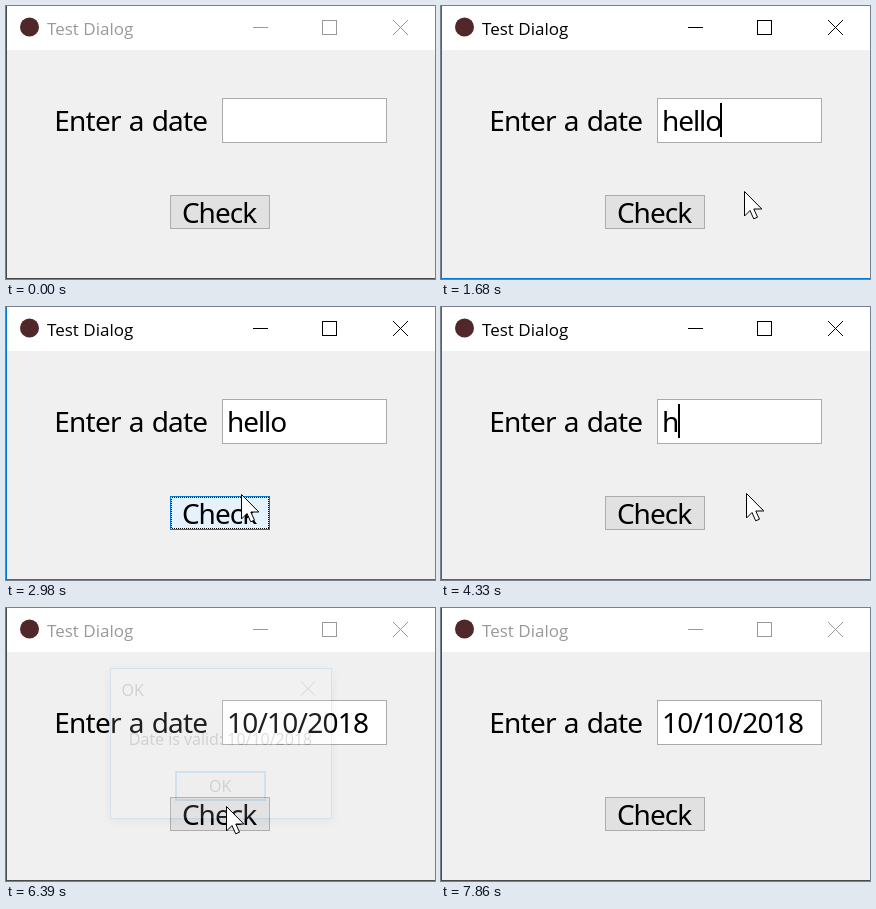
Write an HTML page that moves like this. It is 429 by 273 pixels and loops after 7930 ms.

```html
<!DOCTYPE html>
<html lang="en">
<head>
<meta charset="utf-8">
<title>Test Dialog</title>
<style>
  html, body { margin: 0; width: 100%; height: 100%; overflow: hidden; background: #f0f0f0; }
  svg { display: block; width: 429px; height: 273px; }
  text { white-space: pre; }
  .ui { font: 17.2px "Open Sans", "Noto Sans", sans-serif; }
  .form { font: 28px "Noto Sans", "Open Sans", sans-serif; letter-spacing: -.78px; }
  .mid { text-anchor: middle; }
  .glyph { fill: none; stroke: #000; }
  .box, .caret { shape-rendering: crispEdges; }
  .button { fill: #e1e1e1; stroke: #adadad; }
  .button.focus { stroke: #0078d7; stroke-width: 2; }
  .button.hover { fill: #e5f1fb; stroke: #0078d7; stroke-width: 1; }
  .button.down { fill: #cce4f7; stroke: #005499; stroke-width: 1; }
  #main .title { font-size: 17px; }
  #main.idle .title { fill: #999; }
  #main.idle .glyph { stroke: #999; }
  #main .edge { fill: #0078d7; }
  #main.idle .edge { fill: #4a4a4a; }
  #dialog { transform-origin: 215px 135px; filter: drop-shadow(0 3px 6px rgba(0, 0, 0, .38)); }
</style>
</head>
<body>
<svg viewBox="0 0 429 273">
  <g id="main">
    <rect width="429" height="273" fill="#f0f0f0"/>
    <rect width="429" height="44" fill="#fff"/>
    <rect class="edge box" width="1" height="273"/>
    <rect class="edge box" y="272" width="429" height="1"/>
    <circle cx="23.5" cy="21" r="9.5" fill="#50282a"/>
    <text class="ui title" x="41" y="29">Test Dialog</text>
    <path class="glyph box" d="M247 21.5h15M316.500 14.500h14v14h-14z"/>
    <path class="glyph" d="M387 14l15 15m0-15l-15 15"/>
    <text class="form" x="48.300" y="125" word-spacing="1.5">Enter a date</text>
    <rect class="box" x="216.500" y="92.500" width="164" height="44" fill="#fff" stroke="#ababab"/>
    <text class="form" id="value" x="221" y="125"></text>
    <rect class="caret" id="caret" y="97" width="1.500" height="34"/>
    <rect class="button box" id="check" x="164.500" y="189.500" width="99" height="33"/>
    <rect class="box" id="dots" x="165.500" y="190.500" width="97" height="31"
          fill="none" stroke="#000" stroke-dasharray="1 1"/>
    <text class="form mid" x="213" y="217" style="letter-spacing:-1px">Check</text>
  </g>
  <g id="dialog">
    <rect class="box" id="frame" y="54.500" height="162" fill="#f0f0f0" stroke="#1b83d6"/>
    <rect class="box" id="bar" y="55" height="44" fill="#fff"/>
    <text class="ui" id="heading" y="84"></text>
    <path class="glyph" id="close" d="M0 0l15 15m0-15l-15 15"/>
    <text class="ui mid" id="message" x="214.500" y="137"></text>
    <rect class="button box focus" id="ok" x="167" y="166" width="95" height="30"/>
    <text class="ui mid" x="214" y="188">OK</text>
  </g>
  <path id="arrow" d="M0 0V24.500L5.500 19 9.200 27.300 13 25.700 9.300 17.500H17.300Z" fill="#fff" stroke="#000"/>
  <path id="beam" d="M-4.500-11.500h4l.5 1 .5-1h4M0-11V11M-4.500 11.500h4l.5-1 .5 1h4" fill="none" stroke="#000"/>
</svg>
<script>
const LOOP = 7930;
const el = id => document.getElementById(id);

// Evenly timed successive prefixes of a word.
const typing = (word, from, to, start, gap) =>
  Array.from({ length: to - from }, (_, i) => [start + i * gap, word.slice(0, from + i + 1)]);
const DATE = '10/10/2018';
const VALUE = [
  [0, ''],
  ...typing('hello', 0, 5, 1110, 35),
  [4190, 'hell'], [4230, 'hel'], [4280, 'he'], [4330, 'h'], [4390, ''],
  ...typing(DATE, 0, 7, 4860, 43),
  ...typing(DATE, 7, 10, 5450, 40)
];

// Times at which the flag flips, beginning from off.
const CARET = [360, 590, 820, 1050, 1110, 1480, 1680, 1910, 3700, 3930, 4130,
               4590, 4820, 5350, 5450, 5650, 5880, 6110];
const ACTIVE = [360, 2040, 2930, 6380, 7290, 7860];
const CHECK_FOCUS = [1990, 3700, 6330, 7860];
const PRESS = [1960, 2010, 2840, 2900, 6300, 6350, 7220, 7270];

const DIALOGS = [
  { open: 2040, shut: 2890, x: 112, width: 205, heading: 'Error', message: 'Date is invalid: hello' },
  { open: 6380, shut: 7250, x: 96, width: 237, heading: 'OK', message: 'Date is valid: ' + DATE }
];
const FADE = 85;

const MOUSE = [
  [130, 440, 165], [330, 284, 115], [400, 284, 115], [590, 303, 185],
  [1680, 303, 185], [1930, 222, 199], [2730, 222, 199], [2830, 235, 187],
  [3300, 235, 187], [3620, 288, 116], [3730, 288, 116], [3930, 305, 186],
  [6050, 305, 186], [6270, 220, 198], [6980, 220, 198], [7120, 223, 187],
  [7350, 223, 187], [7630, 330, 290]
];

const pick = (steps, t) => steps.reduce((v, s) => s[0] <= t ? s[1] : v, steps[0][1]);
const isOn = (flips, t) => flips.filter(f => f <= t).length % 2 === 1;
const clamp = v => Math.max(0, Math.min(1, v));
const inside = ([x, y], l, t, r, b) => x >= l && x < r && y >= t && y < b;
const show = (node, on) => node.style.display = on ? '' : 'none';

function mouseAt(t) {
  const i = MOUSE.findIndex(p => p[0] > t);
  if (i < 1) return [440, 290];
  const [t0, x0, y0] = MOUSE[i - 1], [t1, x1, y1] = MOUSE[i];
  const k = (t - t0) / (t1 - t0), e = k * k * (3 - 2 * k);
  return [x0 + (x1 - x0) * e, y0 + (y1 - y0) * e];
}

function setButton(node, focus, hover, down) {
  node.classList.toggle('focus', focus);
  node.classList.toggle('hover', hover);
  node.classList.toggle('down', hover && down);
}

function drawDialog(t) {
  const d = DIALOGS.find(d => t >= d.open && t < d.shut + FADE);
  show(el('dialog'), d);
  if (!d) return;
  const k = clamp((t - d.open) / FADE) * clamp(1 - (t - d.shut) / FADE);
  el('dialog').style.opacity = k;
  el('dialog').style.transform = `scale(${0.92 + 0.08 * k})`;
  el('frame').setAttribute('x', d.x + .5);
  el('frame').setAttribute('width', d.width);
  el('bar').setAttribute('x', d.x + 1);
  el('bar').setAttribute('width', d.width - 1);
  el('heading').setAttribute('x', d.x + 12);
  el('heading').textContent = d.heading;
  el('message').textContent = d.message;
  el('close').setAttribute('transform', `translate(${d.x + d.width - 32} 69)`);
}

function draw(t) {
  const mouse = mouseAt(t), active = isOn(ACTIVE, t), down = isOn(PRESS, t);
  el('main').classList.toggle('idle', !active);

  const value = pick(VALUE, t), field = el('value');
  field.textContent = value;
  field.style.letterSpacing = value[0] === 'h' ? '-1.1px' : '';
  el('caret').setAttribute('x', 221 + (value ? Math.floor(field.getComputedTextLength()) : 0));
  show(el('caret'), isOn(CARET, t));

  const focus = active && isOn(CHECK_FOCUS, t);
  setButton(el('check'), focus, active && inside(mouse, 164, 187, 264, 223), down);
  show(el('dots'), focus);
  setButton(el('ok'), true, !active && inside(mouse, 166, 165, 262, 197), down);
  drawDialog(t);

  const overField = active && inside(mouse, 216, 92, 381, 137);
  const at = `translate(${mouse.map(v => Math.round(v) + .5)})`;
  for (const id of ['arrow', 'beam']) {
    el(id).setAttribute('transform', at);
    show(el(id), (id === 'beam') === overField);
  }
}

const start = performance.now();
function tick() {
  draw((performance.now() - start) % LOOP);
  requestAnimationFrame(tick);
}
tick();
</script>
</body>
</html>
```
